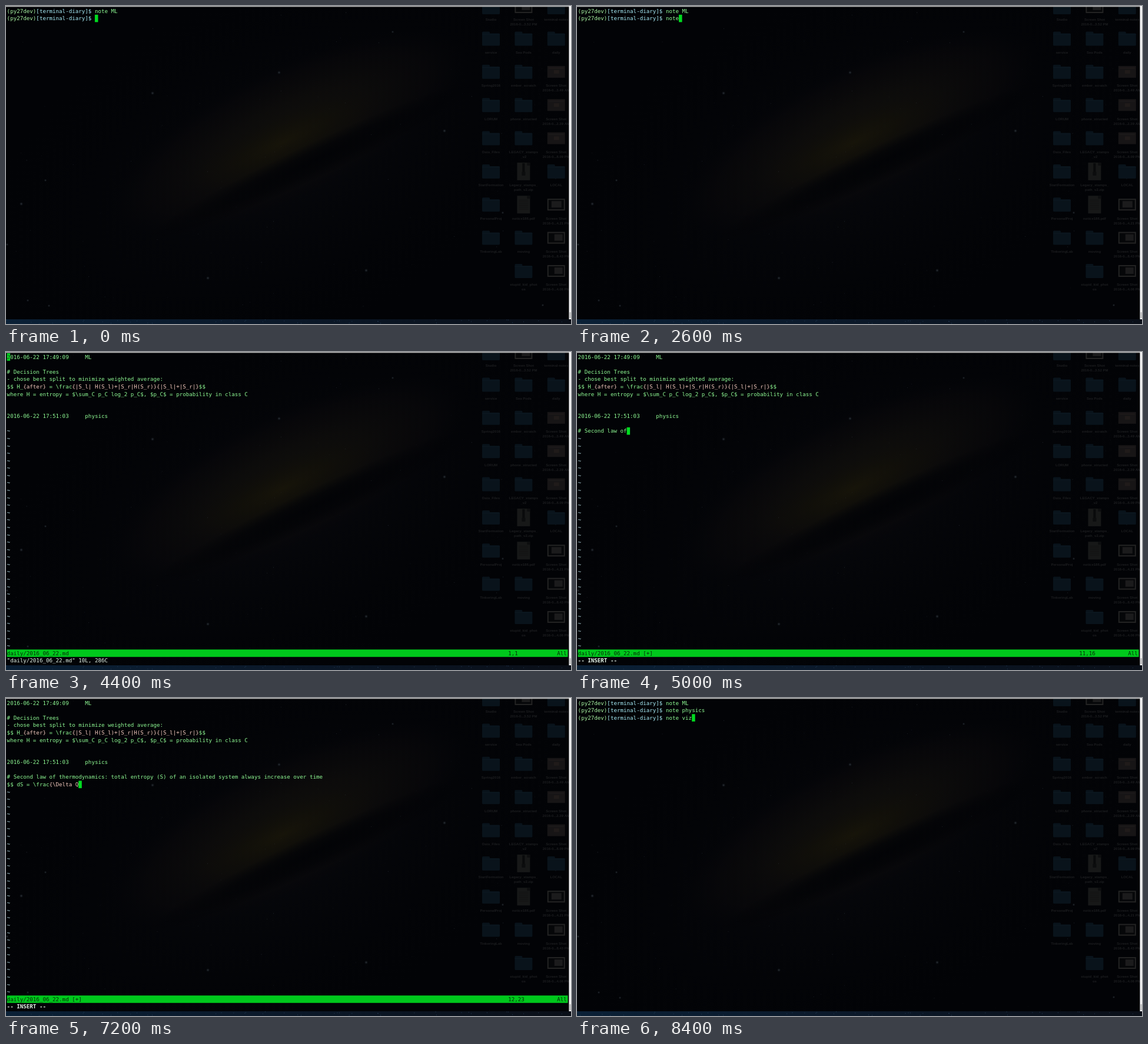
Write an HTML page with a canvas that moves like this. It is 960 by 540 pixels and loops after 8600 ms.

```html
<!DOCTYPE html>
<html lang="en">
<head>
<meta charset="utf-8">
<title>Terminal notes</title>
<style>
html, body { margin: 0; width: 100%; height: 100%; overflow: hidden; background: #020305; }
canvas { display: block; }
</style>
</head>
<body>
<canvas id="stage" width="960" height="540"></canvas>
<script>
const LOOP = 8600, STEP = 200;
const CELL_W = 5.53, CELL_H = 12.575, LEFT = 1.6, TOP = 2.2;
const GREEN = '#8ffb94', CYAN = '#a9eef8', PINK = '#f3c9bd', WHITE = '#e6f5e8', BAR = '#00c81c';
const ctx = document.getElementById('stage').getContext('2d');
const wallpaper = document.createElement('canvas');
wallpaper.width = 960;
wallpaper.height = 540;

function box(c, x, y, w, h, color) {
  c.fillStyle = color;
  c.fillRect(x, y, w, h);
}

// Soft ellipse: stops are [offset, color] pairs
function glow(c, x, y, rx, ry, angle, stops) {
  c.save();
  c.translate(x, y);
  c.rotate(angle);
  c.scale(rx, ry);
  const g = c.createRadialGradient(0, 0, 0, 0, 0, 1);
  stops.forEach(([at, color]) => g.addColorStop(at, color));
  c.fillStyle = g;
  c.fillRect(-1, -1, 2, 2);
  c.restore();
}

function random(seed) {
  return () => (seed = (seed * 16807) % 2147483647) / 2147483647;
}

function drawSky(c) {
  box(c, 0, 0, 960, 540, '#020306');
  glow(c, 470, 260, 560, 300, -0.42, [[0, 'rgba(8,9,13,.9)'], [1, 'rgba(3,4,7,0)']]);
  glow(c, 480, 216, 330, 112, -0.45, [[0, '#11100c'], [0.45, 'rgba(13,12,11,.9)'], [0.8, 'rgba(9,8,10,.6)'], [1, 'rgba(6,6,9,0)']]);
  glow(c, 470, 232, 175, 46, -0.44, [[0, 'rgba(24,21,9,.85)'], [0.5, 'rgba(18,16,8,.5)'], [1, 'rgba(14,12,8,0)']]);
  glow(c, 525, 262, 330, 30, -0.44, [[0, 'rgba(2,3,6,.95)'], [0.5, 'rgba(2,3,6,.7)'], [1, 'rgba(2,3,6,0)']]);
  const rnd = random(77);
  for (let i = 0; i < 130; i++) {
    const s = 0.5 + rnd() * 0.7;
    box(c, rnd() * 956, rnd() * 530, s, s, `rgba(90,100,115,${0.1 + rnd() * 0.25})`);
  }
  const stars = [[26, 336], [612, 449], [249, 148], [464, 113], [745, 212], [343, 462], [73, 509],
    [37, 500], [844, 351], [657, 44], [912, 508], [2, 405], [67, 296]];
  stars.forEach(([x, y], i) => {
    const r = i < 6 ? 3.5 : 2.5;
    glow(c, x, y, r, r, 0, [[0, '#30353b'], [0.4, '#14181d'], [1, 'rgba(6,8,12,0)']]);
  });
}

function folder(c, x, y) {
  c.fillStyle = '#09131b';
  c.beginPath();
  c.roundRect(x - 15, y - 12, 13, 6, 1.5);
  c.roundRect(x - 15, y - 9, 30, 21, 1.5);
  c.fill();
  box(c, x - 15, y - 8, 30, 1, '#0d1922');
}

function screenshot(c, x, y, row) {
  const framed = row === 0 || row > 5;
  box(c, x - 15, y - 10, 30, 20, framed ? '#232323' : '#171516');
  if (framed) {
    box(c, x - 13, y - 8, 26, 16, '#060709');
    box(c, row === 6 ? x - 8 : x - 3, y - 6, row === 6 ? 17 : 14, 11, '#1b1b1c');
  } else {
    box(c, x - 13, y - 7, 26, 1, '#211d1d');
    box(c, x - 4, y - 3, 9, 6, '#201b1a');
  }
}

function paper(c, x, y, zip) {
  box(c, x - 11, y - 15, 22, 30, '#171818');
  box(c, x + 6, y - 15, 5, 5, '#0d0e0f');
  if (zip) {
    box(c, x - 2, y - 14, 4, 15, '#090a0b');
    box(c, x - 3, y + 1, 6, 6, '#0c0d0e');
  } else {
    for (let i = 0; i < 6; i++) box(c, x - 8, y - 8 + i * 3, 16, 1, '#101111');
  }
}

function drawIcons(c) {
  const shot = time => 'Screen Shot|2016-0...' + time;
  const rows = [
    ['Studio', shot('3.52 PM'), 'terminal-notes'],
    ['service', 'Sea Pods', 'daily'],
    ['Spring2016', 'ember_scratch', shot('3.49 AM')],
    ['LORUM', 'phone_structed', shot('2.39 AM')],
    ['Data_Files', 'LEGACY_stamps|_v2', shot('8.09 PM')],
    ['StartFormation', 'Legacy_stamps_|path_v2.zip', 'LOCAL'],
    ['PersonalProj', 'notice188.pdf', shot('4.21 PM')],
    ['TinkeringLab', 'moving', shot('8.43 PM')],
    ['', 'stupid_kid_phot|os', shot('4.06 PM')]
  ];
  c.font = 'bold 6px "Liberation Sans", Arial, sans-serif';
  c.textAlign = 'center';
  rows.forEach((names, row) => names.forEach((name, col) => {
    if (!name) return;
    const x = 824 + col * 55.4, y = row ? 55.5 + (row - 1) * 56.35 : 2;
    if (name.startsWith('Screen')) screenshot(c, x, y, row);
    else if (/zip|pdf/.test(name)) paper(c, x, y, name.includes('zip'));
    else folder(c, x, y);
    c.fillStyle = '#1d1e20';
    name.split('|').forEach((line, i) => c.fillText(line, x, y + (row ? 25.5 : 22.5) + i * 8));
  }));
}

function drawEdges(c) {
  const sea = c.createLinearGradient(0, 0, 960, 0);
  sea.addColorStop(0, '#0a2036');
  sea.addColorStop(0.4, '#0b1a2c');
  sea.addColorStop(1, '#0a0f18');
  box(c, 0, 532, 960, 8, sea);
  const rnd = random(31);
  for (let i = 0; i < 45; i++) box(c, rnd() * 960, 532 + rnd() * 7, 1, 1, '#27405a');
  box(c, 0, 0, 960, 1.4, '#b9b9b9');
  box(c, 956.5, 0, 3.5, 532, '#f1f1f1');
  box(c, 957.5, 520, 2, 10, '#b5b5b5');
}

const cellX = col => LEFT + col * CELL_W;
const cellY = row => TOP + row * CELL_H;

function put(row, col, text, color = GREEN, weight = '') {
  ctx.font = weight + ' 9.19px "DejaVu Sans Mono", monospace';
  ctx.fillStyle = color;
  [...text].forEach((ch, i) => {
    if (ch !== ' ') ctx.fillText(ch, cellX(col + i), cellY(row) + 9.5);
  });
}

function cursor(row, col) {
  box(ctx, cellX(col), cellY(row), CELL_W, CELL_H, '#00dc20');
}

// Braced groups have their own color
function putMath(row, text) {
  let col = 0;
  text.split(/(\{[^}]*\}?)/).forEach(part => {
    put(row, col, part, part[0] === '{' ? PINK : GREEN);
    col += part.length;
  });
}

function drawShell(commands) {
  commands.forEach((command, row) => {
    put(row, 0, '(py27dev)', '#a8f5a2');
    put(row, 9, '[terminal-diary]$', CYAN);
    put(row, 27, command);
  });
  const last = commands.length - 1;
  cursor(last, 27 + commands[last].length);
}

const note = [
  '2016-06-22 17:49:09     ML', '', '# Decision Trees',
  '- chose best split to minimize weighted average:',
  '$$ H_{after} = \\frac{|S_l| H(S_l)+|S_r|H(S_r)}{|S_l|+|S_r|}$$',
  'where H = entropy = $\\sum_C p_C log_2 p_C$, $p_C$ = probability in class C',
  '', '', '2016-06-22 17:51:03     physics', ''
];
const typed = '# Second law of thermodynamics: total entropy (S) of an isolated system always increase over time\n$$ dS = \\frac{\\Delta Q}{T}$$';
const pauseAt = typed.indexOf('ways increase');
const formulaAt = typed.indexOf('Q') + 1;

function typedCount(step) {
  if (step <= 29) return Math.round(pauseAt * (step - 24) / 5);
  if (step <= 36) return Math.round(pauseAt + (formulaAt - pauseAt) * (step - 29) / 7);
  return typed.length;
}

function drawEditor(step) {
  const inserting = step >= 24, closing = step === 38;
  const added = inserting ? typed.slice(0, typedCount(step)).split('\n') : [];
  const lines = note.concat(added);
  const row = inserting ? lines.length - 1 : step === 22 ? 0 : 9;
  const col = inserting ? lines[row].length : 0;
  if (closing) cursor(41, 3);
  else cursor(row, col);
  lines.forEach((line, i) => line.startsWith('$$') ? putMath(i, line) : put(i, 0, line));
  if (row === 0) put(0, 0, '2', '#07330b');
  for (let i = lines.length; i < 40; i++) put(i, 0, '~', '#b3d9e2');

  box(ctx, LEFT, cellY(40), 953, CELL_H, BAR);
  const ink = '#052a08';
  put(40, 0, 'daily/2016_06_22.md' + (inserting ? ' [+]' : ''), ink);
  put(40, 154, `${row + 1},${lines[row].length ? col + 1 : '0-1'}`, ink);
  put(40, 169, 'All', ink);
  if (closing) put(41, 0, ':wq', WHITE);
  else if (inserting) put(41, 0, '-- INSERT --', WHITE, 'bold');
  else put(41, 0, '"daily/2016_06_22.md" 10L, 286C', WHITE);
}

function render(time) {
  const step = Math.floor((time % LOOP) / STEP);
  ctx.drawImage(wallpaper, 0, 0);
  if (step < 22) {
    drawShell(['note ML', 'note physics'.slice(0, Math.max(0, step - 9))]);
  } else if (step < 39) {
    drawEditor(step);
  } else {
    drawShell(['note ML', 'note physics', 'note viz'.slice(0, [0, 3, 5, 8][step - 39])]);
  }
}

const back = wallpaper.getContext('2d');
drawSky(back);
drawIcons(back);
drawEdges(back);

const start = performance.now();
function tick() {
  render(performance.now() - start);
  requestAnimationFrame(tick);
}
tick();
</script>
</body>
</html>
```
